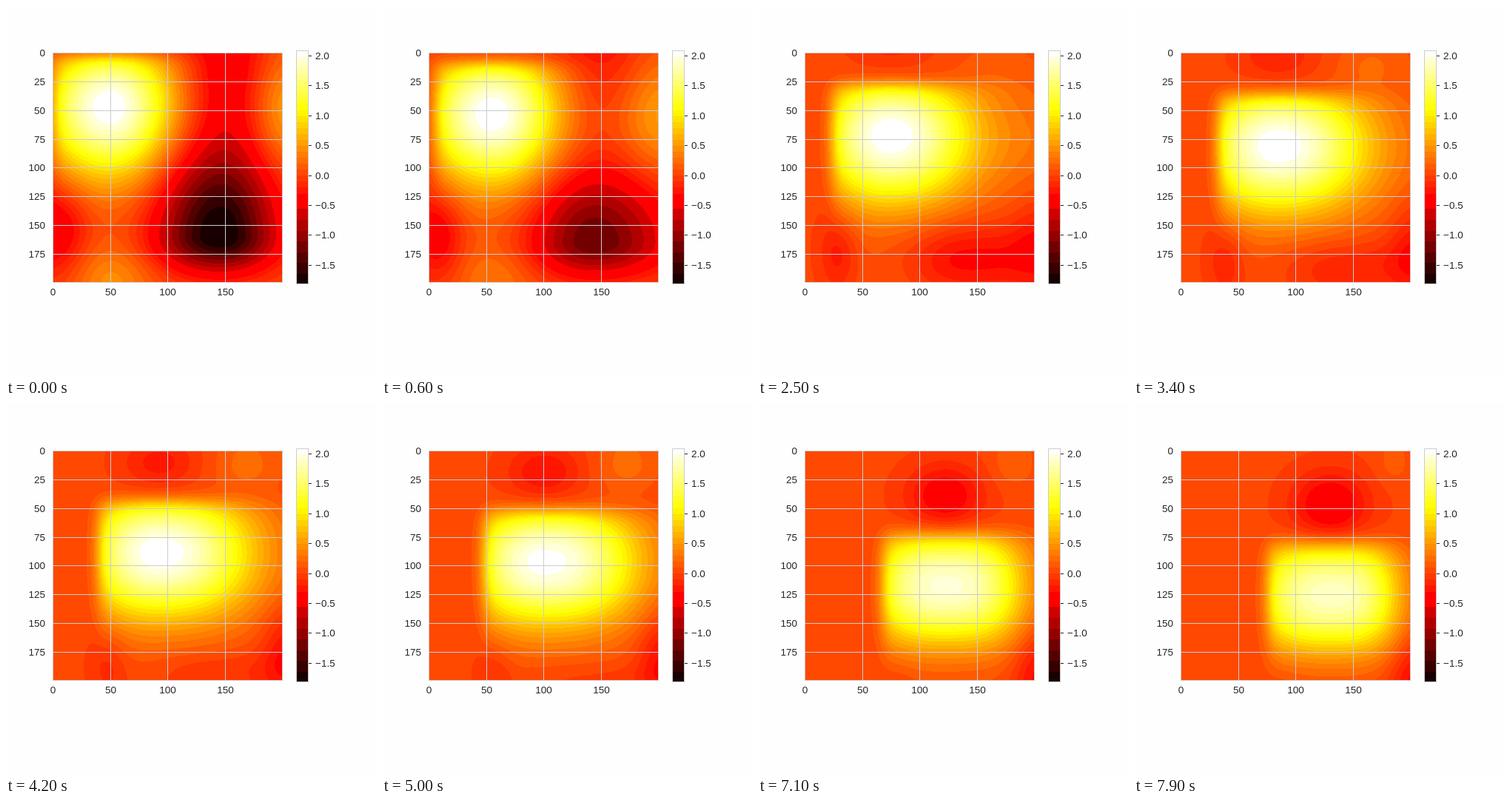
Write an HTML page with a canvas that moves like this. It is 500 px wide and 500 px high and loops after 8 s.

```html
<!DOCTYPE html>
<html>
<head>
<meta charset="utf-8">
<style>
html, body { margin: 0; width: 100%; height: 100%; overflow: hidden; background: #fefefe; }
canvas { display: block; width: 500px; height: 500px; }
</style>
</head>
<body>
<canvas id="stage" width="500" height="500"></canvas>
<script>
const ctx = document.getElementById('stage').getContext('2d');
const EDGE = 63, SIZE = 310, UNIT = SIZE / 200;
const STEP = 100, STEPS = 80;

const fade = (n, span) => Math.exp(-n / span);
const bell = (d, half, power = 2) => Math.exp(-Math.LN2 * Math.pow(Math.abs(d) / half, power));
const sigmoid = x => 1 / (1 + Math.exp(-x));
const axis = f => Float32Array.from({ length: SIZE }, (_, i) => f((i + 0.5) / UNIT));

// A hump or dip with its own half-width on each side
const bump = (height, x, y, left, right, up, down) => ({
  xs: axis(p => height * bell(p - x, p < x ? left : right)),
  ys: axis(p => bell(p - y, p < y ? up : down))
});

// The main hump drifts diagonally, cut off behind by a steep front
function crest(n) {
  const t = n / STEPS, x = 50 + 0.98 * n, y = 47 + 0.98 * n, front = 0.97 * n;
  const height = 2.1 - 0.28 * t ** 3;
  const right = 46 + 26 * Math.sin(Math.PI * n / 100) ** 2;
  return {
    xs: axis(p => height * sigmoid((p - front + 1) / 4) *
      (p < x ? bell(p - x, 50 + 0.2 * n) : bell(p - x, right, 2 + 1.3 * t * t))),
    ys: axis(p => sigmoid((p - front - 2) / (3.5 + 2 * t)) *
      (p < y ? bell(p - y, 45) : bell(p - y, 51 - 8 * t * t, 2 + 0.4 * t)))
  };
}

function waves(n) {
  const swell = 40 - 0.35 * n, dip = 12 + 0.15 * n;
  const side = 13 + 11 * fade(n, 8), tall = 34 - 0.2 * n;
  return [
    crest(n),
    // deep trough, lower right
    bump(-1.88 * fade(n, 16), 146 - 0.3 * n, 160 + 0.75 * n, 43, 38 + 2 * n, 60 * fade(n, 30), 24),
    // upper right: a fading dip, then a low swell
    bump(-0.55 * fade(n, 14), 153, 15 - 2 * n, 33, 33, 60, 60),
    bump(0.22 * Math.sin(Math.PI * n / 95), 150 + 0.45 * n, 12, swell, swell, 30, 30 - 0.2 * n),
    // left trough
    bump(-0.6 * fade(n, 36), 2 + 1.1 * n, 153 + 0.8 * n, side, side, tall, tall),
    // swells at the bottom and right edges
    bump(0.42 * fade(n, 15), 51 + 0.9 * n, 200, 30, 30, 28, 28),
    bump(0.58 * bell(n, 20), 202, 50 + n, 26 + 1.2 * n, 26, 42, 42),
    // trough entering from the top
    bump(-0.0066 * n, 50 + 1.02 * n, -31 + 0.99 * n, 27, 27, dip, dip),
    // lower right corner
    bump(-0.38 * (1 - bell(n, 25)), 203, 145 + 0.7 * n, 17, 17, 32, 32)
  ];
}

// Colour bands: wide in the dark part, 0.1 above it
const MIN = -1.8, MAX = 2.1, FINE = -0.3, DARK = 7;
const edges = [MIN];
for (let i = 0; i < DARK; i++) edges.push(-1.64 + 0.18 * i);
for (let i = -3; i <= 21; i++) edges.push(i / 10);

const byte = v => Math.round(255 * Math.min(1, Math.max(0, v)));
const bands = edges.slice(0, -1).map((lo, i) => {
  if (i === DARK) return [255, 0, 0];
  if (i === edges.length - 2) return [255, 255, 255];
  const f = ((lo + edges[i + 1]) / 2 - MIN) / (MAX - MIN);
  return [byte(0.0416 + f / 0.365 * 0.958), byte((f - 0.365) / 0.381), byte((f - 0.746) / 0.254)];
});

function bandOf(v) {
  if (v >= FINE) return Math.min(bands.length - 1, DARK + 1 + Math.floor((v - FINE) * 10));
  return Math.min(DARK, Math.max(0, 1 + Math.floor((v + 1.64) / 0.18)));
}

const image = ctx.createImageData(SIZE, SIZE);
function drawField(n) {
  const list = waves(n), data = image.data;
  let o = 0;
  for (let j = 0; j < SIZE; j++) {
    for (let i = 0; i < SIZE; i++) {
      let v = 0.03;
      for (const w of list) v += w.xs[i] * w.ys[j];
      const [r, g, b] = bands[bandOf(v)];
      data[o++] = r;
      data[o++] = g;
      data[o++] = b;
      data[o++] = 255;
    }
  }
  ctx.putImageData(image, EDGE, EDGE);
}

function label(text, x, y, align) {
  ctx.fillStyle = '#262626';
  ctx.textAlign = align;
  ctx.fillText(text, x, y);
}

function drawAxes() {
  ctx.strokeStyle = '#ccc';
  ctx.strokeRect(EDGE + 0.5, EDGE + 0.5, SIZE, SIZE);
  for (let v = 0; v < 200; v += 25) {
    const p = Math.round(EDGE + 0.4 + v * UNIT);
    ctx.fillStyle = '#ccc';
    ctx.fillRect(EDGE, p, SIZE, 1);
    if (v % 50 === 0) ctx.fillRect(p, EDGE, 1, SIZE);
    label(v, 53, p + 5, 'right');
    if (v % 50 === 0) label(v, p + 0.5, 391, 'center');
  }
}

function drawBar() {
  const yOf = v => 229.3 - v * 80.7;
  bands.forEach((c, i) => {
    const top = Math.round(yOf(edges[i + 1])), bottom = Math.round(yOf(edges[i]));
    ctx.fillStyle = `rgb(${c})`;
    ctx.fillRect(392, top, 16, bottom - top);
  });
  ctx.strokeStyle = '#ccc';
  ctx.strokeRect(392.5, 60.5, 16, 315);
  for (let v = -1.5; v <= 2; v += 0.5) {
    const y = Math.floor(yOf(v) - 0.3);
    ctx.fillStyle = '#262626';
    ctx.fillRect(409, y, 4, 1);
    label((v < 0 ? '\u2212' : '') + Math.abs(v).toFixed(1), 418, y + 5, 'left');
  }
}

let last = -1;
function draw(now) {
  const n = Math.floor(now / STEP) % STEPS;
  if (n !== last) {
    last = n;
    ctx.fillStyle = '#fefefe';
    ctx.fillRect(0, 0, 500, 500);
    ctx.font = '13.5px "Liberation Sans", Arial, sans-serif';
    drawField(n);
    drawAxes();
    drawBar();
  }
  requestAnimationFrame(draw);
}
draw(0);
</script>
</body>
</html>
```
